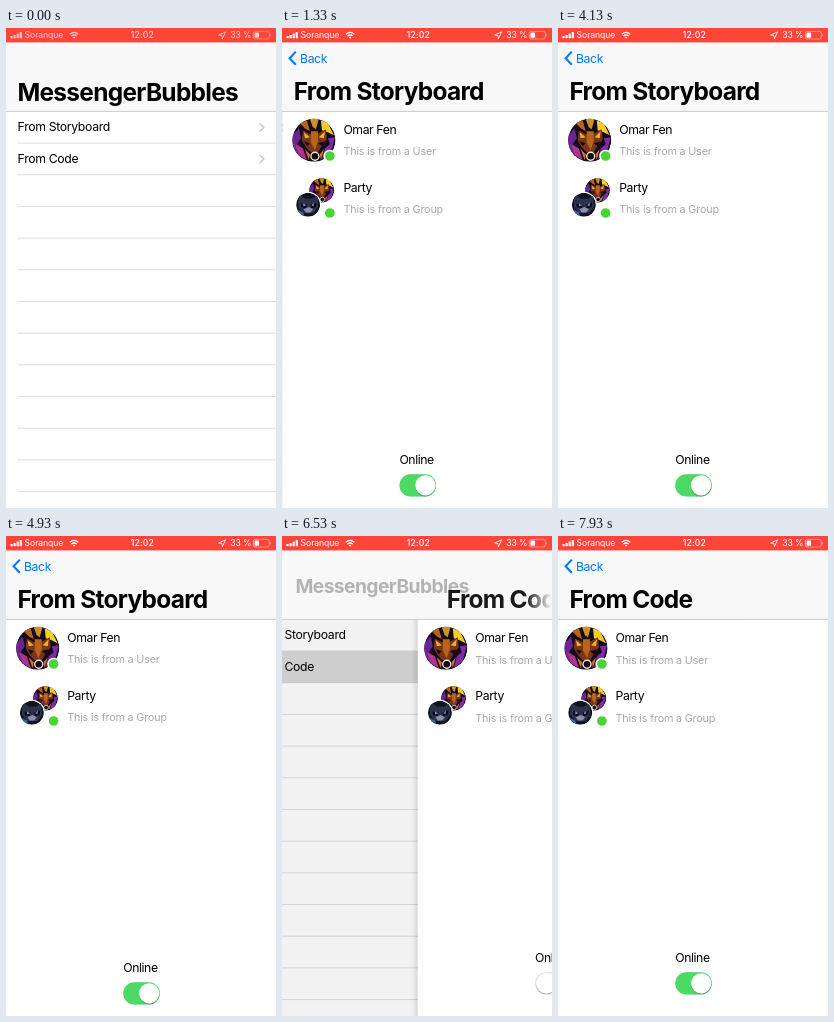
Animation, 270 px wide and 480 px high, one loop 8 s. Source, as an HTML page:

```html
<!DOCTYPE html>
<html lang="en">
<head>
<meta charset="utf-8">
<title>MessengerBubbles</title>
<style>
  html, body { margin: 0; width: 100%; height: 100%; overflow: hidden; background: #fff; }
  svg { display: block; width: 100vw; height: 100vh; }
  text {
    font: 12.24px Inter, Roboto, "Liberation Sans", sans-serif;
    font-optical-sizing: none;
    letter-spacing: -.41px;
    white-space: pre;
  }
  .title { font-size: 24.48px; font-weight: 700; letter-spacing: -.72px; }
  .row { letter-spacing: -.33px; }
  .sub { font-size: 10.8px; letter-spacing: -.19px; fill: #a9a9a9; }
  .bar text { font-size: 8.64px; letter-spacing: -.08px; fill: #fff; }
  .bar .time { font-weight: 500; letter-spacing: .15px; }
  .back { fill: #007aff; }
  .line { stroke: #c8c7cc; stroke-width: .6; }
  .hit { fill: #d9d9d9; }
</style>
</head>
<body>
<svg id="stage" viewBox="0 0 270 480" preserveAspectRatio="none"></svg>
<script>
const NAV = 83.4, ROW = 31.68, LOOP = 8000;

const defs = `<defs>
  <clipPath id="round"><circle r="21.6"/></clipPath>
  <linearGradient id="edge"><stop offset="0" stop-opacity="0"/><stop offset="1" stop-opacity=".12"/></linearGradient>
  <linearGradient id="fade">
    <stop offset="0" stop-color="#f8f8f8" stop-opacity="0"/><stop offset="1" stop-color="#f8f8f8"/>
  </linearGradient>
  <g id="wolf" clip-path="url(#round)">
    <circle r="21.6" fill="#16081c"/>
    <path d="M-22-4L-15-12L-13-2L-17 4L-11 9L-14 12L-7 20L-22 12Z" fill="#6a2590"/>
    <path d="M-19 4L-11 8L-7 20L-15 14Z" fill="#b0348a"/>
    <path d="M-14-17L-7-20L-4-9L-9-12Z" fill="#b8651a"/>
    <path d="M-4-21L5-22L2-11L-1-13Z" fill="#c9941f"/>
    <path d="M7-20L14-17L20-5L14-8L8-10Z" fill="#f0cc2c"/>
    <path d="M21-3L14-2L16 4L11 8L8 20L17 13Z" fill="#7d2ba6"/>
    <path d="M-11-10L-4-6L5-7L12-11L13-1L7 7L4 12L-3 12L-8 7L-12 0Z" fill="#7a3416"/>
    <path d="M-3-9L4-9L4 1L1 10L-3 2Z" fill="#b8641c"/>
    <path d="M-10-8L-4-3L-9-2ZM11-9L5-3L10-2Z" fill="#e8b431"/>
    <path d="M-10 1L-4 3L-7 6ZM11 1L4 3L8 6Z" fill="#120610"/>
    <path d="M-9 9L-4 14L-5 20ZM10 9L6 14L7 20Z" fill="#d9762a"/>
    <circle cx="1" cy="16" r="4" fill="#120810" stroke="#f4e6d8" stroke-width="1.4"/>
  </g>
  <g id="cat" clip-path="url(#round)">
    <circle r="21.6" fill="#10131f"/>
    <path d="M-17-19L-5-11L7-11L17-18L18 3L10 15L-9 15L-18 3Z" fill="#2b3348"/>
    <path d="M-13-3L-2 0L-4 6L-13 4ZM4 0L15-4L14 4L6 6Z" fill="#06080f"/>
    <path d="M-8 8L1 4L9 8L4 14L-4 14Z" fill="#8d90ac"/>
    <path d="M-20 8L-9 14L-6 22L-20 20Z" fill="#3f62a8"/>
    <path d="M-9-3L-3 1L-9 3ZM11-4L6 1L10 3Z" fill="#8a7ad0"/>
  </g>
</defs>`;

const text = (x, y, str, cls = '') => `<text x="${x}" y="${y}" class="${cls}">${str}</text>`;

const row = (i, label) => {
  const top = NAV + i * ROW;
  return `<rect id="hit${i}" class="hit" y="${top}" width="270" height="${ROW}" opacity="0"/>
    ${text(11.6, top + 20, label, 'row')}
    <path d="M253.6 ${top + 11.8}l4.2 4.2l-4.2 4.2" fill="none" stroke="#c7c7cc" stroke-width="1.4"/>`;
};

const lines = Array.from({ length: 12 }, (_, i) => {
  const y = NAV + (i + 1) * ROW;
  return `<path class="line" d="M11.6 ${y}H270"/>`;
}).join('');

const list = `<g id="list"><rect y="${NAV}" width="270" height="400" fill="#fff"/>
  ${row(0, 'From Storyboard')}${row(1, 'From Code')}${lines}
  <rect id="dim" y="${NAV}" width="270" height="400"/></g>`;

// cx: avatar centre, tx: text column, sub: subtitle shift, low: height of the switch
const detail = (id, cx, tx, sub, low) => `<g id="${id}">
  <rect x="-6" y="${NAV}" width="6" height="400" fill="url(#edge)"/>
  <rect y="${NAV}" width="270" height="400" fill="#fff"/>
  <use href="#wolf" transform="translate(${cx} 112.2)"/>
  <use href="#wolf" transform="translate(${cx + 7.8} 162.3) scale(.575)"/>
  <circle cx="${cx - 5.8}" cy="176.8" r="13" fill="#fff"/>
  <use href="#cat" transform="translate(${cx - 5.8} 176.8) scale(.555)"/>
  ${[128, 185].map(y => `<g transform="translate(${cx + 15.9} ${y})">
    <circle class="dot" r="5.6" fill="#4ad334" stroke="#fff" stroke-width="1.5"/></g>`).join('')}
  ${text(tx, 106.4 - sub / 2, 'Omar Fen')}${text(tx, 127.2 + sub, 'This is from a User', 'sub')}
  ${text(tx, 164.1 - sub / 2, 'Party')}${text(tx, 184.9 + sub, 'This is from a Group', 'sub')}
  ${text(117.2, low - 21.5, 'Online')}
  <rect x="117.9" y="${low - 10.5}" width="35.3" height="21" rx="10.5" fill="#fff" stroke="#dedede" stroke-width="1.2"/>
  <rect class="on" x="117.3" y="${low - 11.1}" width="36.6" height="22.2" rx="11.1" fill="#4cd964"/>
  <rect y="${low - 8.9}" class="shade" height="20.2" rx="10.1" opacity=".2"/>
  <rect y="${low - 10.1}" class="knob" height="20.2" rx="10.1" fill="#fff"/>
</g>`;

const navBar = `<rect width="270" height="${NAV}" fill="#f8f8f8"/>
  <path d="M0 ${NAV}H270" stroke="#b9b9bb" stroke-width=".7"/>
  <g id="home">${text(0, 8.5, 'MessengerBubbles', 'title')}</g>
  <g id="head"><text id="headText" y="72.3" class="title"></text></g>
  <rect x="244" y="48" width="26" height="34" fill="url(#fade)"/>
  <g id="back">${text(0, 4.5, 'Back', 'back')}</g>
  <path id="chevron" d="M13.8 23.6L7.6 30.2L13.8 36.8" fill="none" stroke="#007aff" stroke-width="2.1"/>`;

const bars = [2.2, 3.4, 4.8, 6.2].map((h, i) =>
  `<rect x="${4.4 + i * 3.1}" y="${10.3 - h}" width="2.2" height="${h}" rx=".5" fill="#fff"/>`).join('');

const statusBar = `<rect width="270" height="14.4" fill="#ff443a"/>
  <g id="status" class="bar">${bars}${text(18.6, 10.4, 'Soranque')}
    <g fill="none" stroke="#fff" stroke-width="1.3">
      <path d="M63.9 6.2Q68.1 2.6 72.3 6.2M65.5 8.1Q68.1 5.9 70.7 8.1"/>
    </g>
    <path d="M66.8 9.2Q68.1 8.2 69.4 9.2L68.1 10.7Z" fill="#fff"/>
    ${text(124.8, 10.4, '12:02', 'time')}
    <path d="M219.6 3.8L212.6 7.1L216 7.5L216.4 10.8Z" fill="none" stroke="#fff" stroke-width=".8"/>
    ${text(224.2, 10.4, '33 %')}
    <rect x="247.3" y="3.4" width="16" height="7.6" rx="1.9" fill="none" stroke="#fff" stroke-width=".6" opacity=".7"/>
    <rect x="248.5" y="4.6" width="4.6" height="5.2" rx=".8" fill="#fff"/>
    <path d="M264.4 5.8q1.3 1.4 0 2.8z" fill="#fff" opacity=".7"/>
  </g>`;

const stage = document.getElementById('stage');
stage.innerHTML = defs + list + detail('board', 31.7, 61.2, 0, 457.4)
  + detail('code', 28, 57.6, .8, 447.3) + navBar + statusBar;

const $ = id => document.getElementById(id);
const clamp = v => Math.min(1, Math.max(0, v));
const set = (el, attrs) => { for (const k in attrs) el.setAttribute(k, attrs[k]); };
const smooth = v => { v = clamp(v); return v * v * (3 - 2 * v); };

// Critically damped spring from 0 to 1
const spring = ms => {
  const w = Math.max(0, ms) * .021;
  return 1 - (1 + w) * Math.exp(-w);
};

const flips = {
  board: { start: 1, at: [1750, 2160, 2620, 3870] },
  code: { start: 0, at: [7350] }
};

function switchValue(t, { start, at }) {
  let v = start, goal = start;
  for (const time of at) {
    goal = 1 - goal;
    v += (goal - v) * smooth((t - time) / 270);
  }
  return v;
}

function drawDetail(id, x, shown, t) {
  const page = $(id);
  set(page, { transform: `translate(${x} 0)`, display: shown ? 'inline' : 'none' });
  if (!shown) return;
  const v = switchValue(t, flips[id]);
  const wide = 20.2 + 4.5 * Math.sin(Math.PI * v);
  const left = 118.3 + v * (35 - wide);
  const pick = cls => page.querySelector(cls);
  set(pick('.on'), { opacity: v });
  for (const cls of ['.knob', '.shade']) set(pick(cls), { x: left, width: wide });
  for (const dot of page.querySelectorAll('.dot')) set(dot, { transform: `scale(${v})`, opacity: v > .01 ? 1 : 0 });
}

function draw(t) {
  const popping = t >= 5465 && t < 6400;
  const second = t >= 6400;
  const p = second ? spring(t - 6451.5) : popping ? 1 - spring(t - 5465) : spring(t - 881);
  const rest = 1 - p;
  const x = 270 * rest;

  set($('list'), { transform: `translate(${-81 * p} 0)` });
  set($('dim'), { opacity: .1 * p });
  set($('hit0'), { opacity: t < 870 ? 0 : 1 - clamp((t - 5610) / 340) });
  set($('hit1'), { opacity: second ? 1 : 0 });
  drawDetail('board', x, !second && p > 0, t);
  drawDetail('code', x, second && p > 0, t);

  // The large title shrinks toward the back button
  const [shrink, lift, dull] = popping ? [.577, 38, 2.25] : [.43, 28, 1.46];
  set($('home'), {
    transform: `translate(${11.4 + 4 * p} ${64 - lift * p}) scale(${1 - shrink * p})`,
    opacity: clamp(1 - dull * p)
  });
  $('headText').textContent = second ? 'From Code' : 'From Storyboard';
  set($('head'), {
    transform: `translate(${11.4 + 305 * rest} 0)`,
    opacity: popping ? clamp(1 - 2 * rest) : clamp(.3 + 1.2 * p)
  });
  set($('back'), {
    transform: `translate(${18 + 43 * rest} ${30.3 + 38 * rest}) scale(${1 + 1.17 * rest})`,
    opacity: clamp((p - .6) / .4)
  });
  set($('chevron'), { opacity: clamp((p - .75) / .25) });
  set($('status'), { opacity: .72 + .28 * clamp((t - 50) / 150) });
}

const begin = performance.now();
function tick() {
  draw((performance.now() - begin) % LOOP);
  requestAnimationFrame(tick);
}
tick();
</script>
</body>
</html>
```
